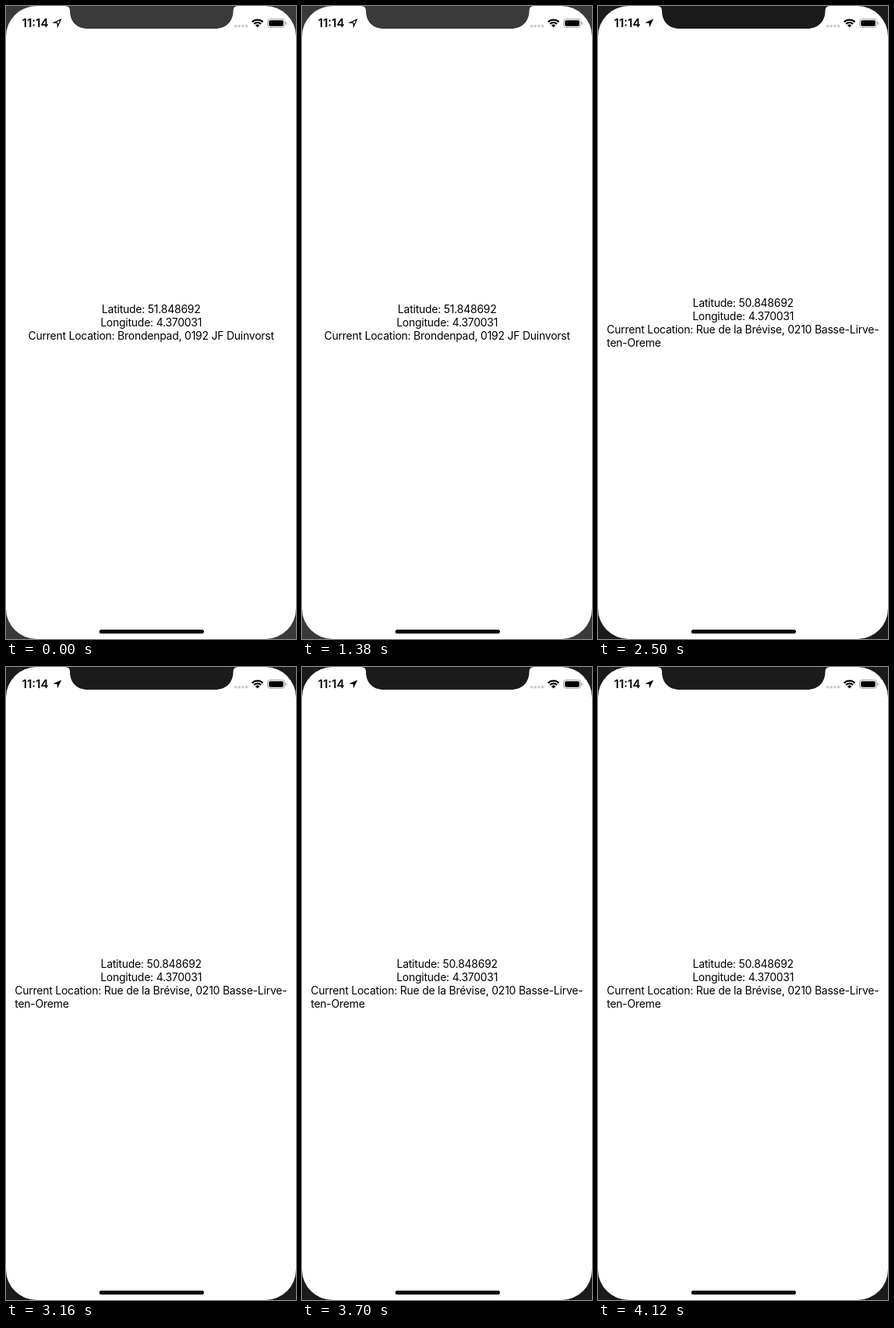
An HTML page with a canvas for the animation above (4400 ms loop, 372 px wide and 810 px high).

```html
<!DOCTYPE html>
<html lang="en">
<head>
<meta charset="utf-8">
<title>Location</title>
<style>
html, body { margin: 0; width: 100%; height: 100%; overflow: hidden; background: #fff; }
canvas, svg { position: absolute; left: 0; top: 0; width: 372px; height: 810px; }
text { font: 13.9px Inter, "Noto Sans", sans-serif; letter-spacing: -0.19px; }
#clock { font-size: 15px; font-weight: 600; letter-spacing: 0; }
.mid { text-anchor: middle; }
</style>
</head>
<body>
<canvas id="screen"></canvas>
<svg viewBox="0 0 372 810">
  <text id="clock" x="20.6" y="27.2">11:14</text>
  <g id="info">
    <text class="mid" id="lat" x="186.2" y="393"></text>
    <text class="mid" x="186.2" y="410">Longitude: 4.370031</text>
    <text id="place" y="427"></text>
    <text id="rest" x="11.2" y="444"></text>
  </g>
</svg>
<script>
const W = 372, H = 810, LOOP = 4400;
const canvas = document.getElementById('screen');
const ctx = canvas.getContext('2d');
const el = id => document.getElementById(id);
const dpr = window.devicePixelRatio || 1;
canvas.width = W * dpr;
canvas.height = H * dpr;

function polygon(points) {
  ctx.beginPath();
  points.forEach(([x, y]) => ctx.lineTo(x, y));
  ctx.closePath();
}

function box(x, y, w, h, r, color) {
  ctx.beginPath();
  ctx.roundRect(x, y, w, h, r);
  ctx.fillStyle = color;
  ctx.fill();
}

function drawNotch(color) {
  ctx.beginPath();
  ctx.moveTo(76, 0);
  ctx.quadraticCurveTo(82, 0, 82, 6);
  ctx.bezierCurveTo(82, 20, 91, 29, 105, 29);
  ctx.lineTo(268, 29);
  ctx.bezierCurveTo(282, 29, 291.5, 20, 291.5, 6);
  ctx.quadraticCurveTo(291.5, 0, 297.5, 0);
  ctx.fillStyle = color;
  ctx.fill();
}

function drawArrow(filled) {
  if (filled) {
    polygon([[71.2, 16.4], [60.2, 21.6], [65.6, 22], [66, 27.4]]);
    ctx.fillStyle = '#000';
    ctx.fill();
  } else {
    polygon([[70.2, 17.4], [61.6, 21.4], [66, 21.7], [66.3, 26]]);
    ctx.strokeStyle = '#000';
    ctx.lineWidth = 1.2;
    ctx.stroke();
  }
}

function drawWifi() {
  const x = 322.6, y = 27.6, half = 0.76;
  const up = -Math.PI / 2;
  ctx.strokeStyle = ctx.fillStyle = '#000';
  ctx.lineWidth = 2.3;
  for (const r of [10, 6.4]) {
    ctx.beginPath();
    ctx.arc(x, y, r, up - half, up + half);
    ctx.stroke();
  }
  ctx.beginPath();
  ctx.moveTo(x, y);
  ctx.arc(x, y, 3.8, up - half, up + half);
  ctx.fill();
}

function drawBattery() {
  ctx.beginPath();
  ctx.roundRect(335.6, 16.7, 21.8, 10.6, 3);
  ctx.strokeStyle = '#a0a0a0';
  ctx.lineWidth = 1;
  ctx.stroke();
  box(337.2, 18.2, 18.6, 7.6, 1.7, '#000');
  box(358.4, 20.2, 1.3, 3.6, [0, 1.2, 1.2, 0], '#a0a0a0');
}

function drawPointer() {
  polygon([[214.8, 68], [214.8, 80.8], [217.7, 78.2], [219.9, 83],
           [222.2, 82], [220.1, 77.4], [224.2, 77.2]]);
  ctx.save();
  ctx.shadowColor = 'rgba(0,0,0,.4)';
  ctx.shadowBlur = 2 * dpr;
  ctx.shadowOffsetY = dpr * 0.7;
  ctx.strokeStyle = '#fff';
  ctx.lineWidth = 1.5;
  ctx.stroke();
  ctx.restore();
  ctx.fillStyle = '#000';
  ctx.fill();
}

function drawScreen(active, pointer) {
  const bezel = active ? '#1b1b1b' : '#3a3a3a';
  ctx.setTransform(dpr, 0, 0, dpr, 0, 0);
  ctx.fillStyle = bezel;
  ctx.fillRect(0, 0, W, H);
  box(0, 0, W, H, 39, '#fff');
  drawNotch(bezel);
  drawArrow(active);
  for (let i = 0; i < 4; i++) box(292.8 + i * 4.65, 24, 3.5, 3.5, 1.75, '#c8c8c8');
  drawWifi();
  drawBattery();
  box(119.7, 798, 134.2, 5, 2.5, '#000');
  if (pointer) drawPointer();
}

function setText(active, resolved) {
  el('lat').textContent = 'Latitude: ' + (active ? '50.848692' : '51.848692');
  const place = el('place');
  place.textContent = 'Current Location: ' +
    (resolved ? 'Rue de la Brévise, 0210 Basse-Lirve-' : 'Brondenpad, 0192 JF Duinvorst');
  place.setAttribute('class', resolved ? '' : 'mid');
  place.setAttribute('x', resolved ? 11.2 : 186.2);
  el('rest').textContent = resolved ? 'ten-Oreme' : '';
  el('info').setAttribute('transform', `translate(0 ${resolved ? -8.5 : 0})`);
}

let start = null, last = '';
function tick(now) {
  if (start === null) start = now;
  const t = (now - start) % LOOP;
  const active = t >= 2300;
  const resolved = t >= 2500;
  const pointer = t >= 3600 && t < 3700;
  const key = [active, resolved, pointer].join();
  if (key !== last) {
    drawScreen(active, pointer);
    setText(active, resolved);
    last = key;
  }
  requestAnimationFrame(tick);
}
tick(performance.now());
</script>
</body>
</html>
```
